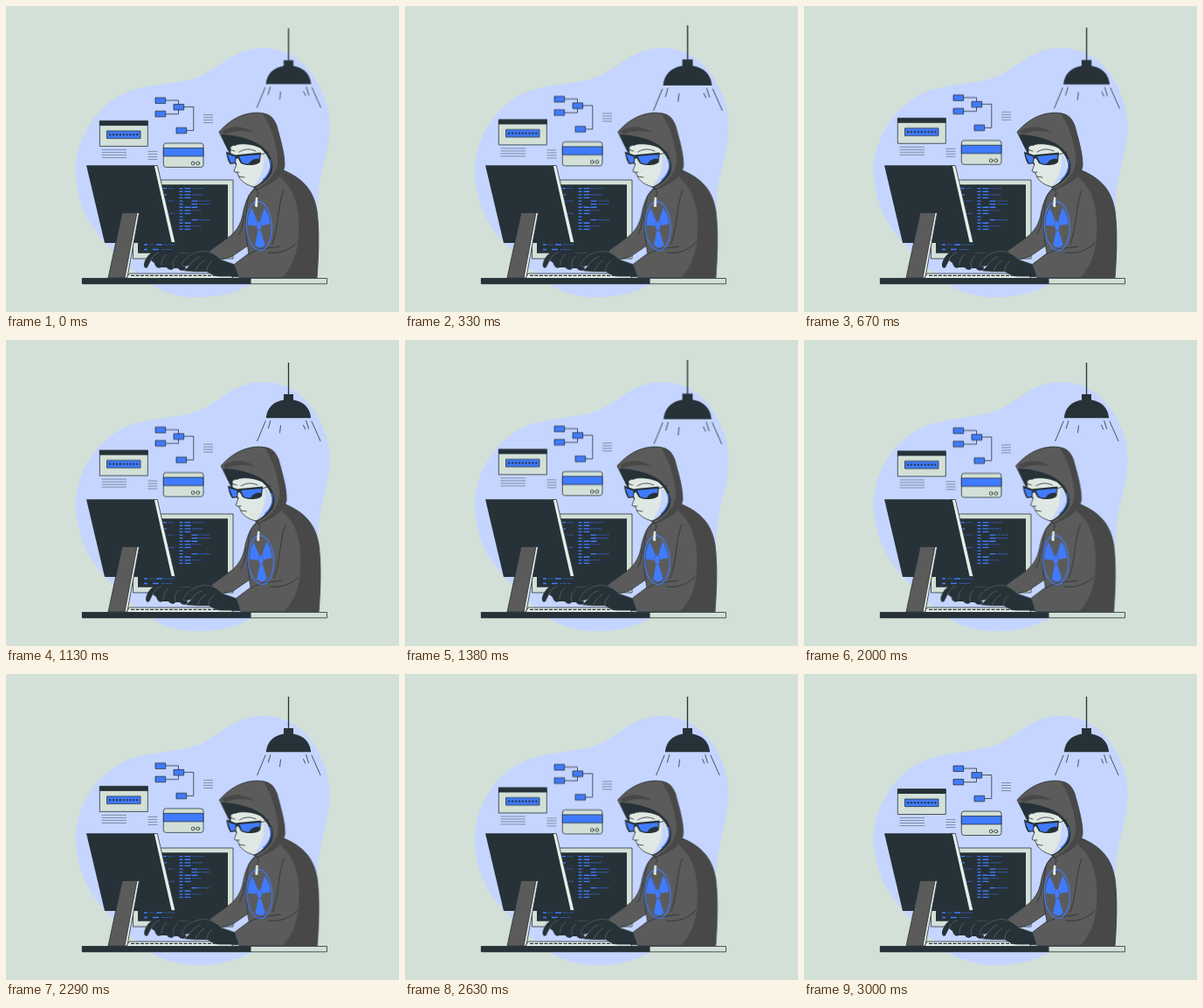
Write an HTML page without scripts that moves like this. It is 450 by 350 pixels and loops after 3040 ms.

```html
<!DOCTYPE html>
<html lang="en">
<head>
<meta charset="utf-8">
<title>Night shift</title>
<style>
  html, body { margin: 0; width: 100%; height: 100%; overflow: hidden; background: #d2e0d7; }
  svg { display: block; width: 100vw; height: 100vh; }
  .ink { fill: #263238; }
  .paper { fill: #d2e0d7; }
  .pale { fill: #e7eee9; }
  .blue { fill: #407bff; }
  .cloth { fill: #5b5b5b; }
  .shade { fill: #484848; }
  .edge { stroke: #263238; stroke-width: .8; stroke-linejoin: round; }
  .line { fill: none; stroke: #263238; stroke-width: .8; stroke-linecap: round; stroke-linejoin: round; }
  .faint { fill: none; stroke: #263238; stroke-width: .6; opacity: .75; }
  .code { fill: none; stroke: #407bff; }
  .dots { stroke-width: 1.1; stroke-dasharray: 1.2 1; opacity: .8; }
  .seam { fill: none; stroke: #6f7a7f; stroke-width: .6; stroke-linecap: round; }

  .float, .pulse, .shake { animation: 3.04s linear -.03s infinite; }
  .float { animation-name: float; }
  .pulse { animation-name: pulse; transform-origin: 323.5px 71px; }
  .shake { animation-name: shake; }

  /* 3 s of movement, then a 40 ms rest */
  @keyframes float {
    0%, 98.7%, 100% { transform: translateY(0); }
    49.34% { transform: translateY(-7px); }
  }
  @keyframes pulse {
    0%, 29.6%, 39.47%, 59.2%, 100% { transform: scale(1); }
    9.87%, 49.34% { transform: scale(1.1); }
  }
  @keyframes shake {
    0%, 98.7%, 100% { transform: translateX(0); }
    9.87%, 88.8% { transform: translateX(-.7px); }
    19.74%, 78.95% { transform: translateX(1.4px); }
    29.6%, 49.34%, 69.08% { transform: translateX(-2.8px); }
    39.47%, 59.2% { transform: translateX(2.8px); }
  }
</style>
</head>
<body>
<svg viewBox="0 0 450 350">
  <defs>
    <path id="rows" class="faint" d="M0 0h11M0 3h11M0 6h11M0 9h11"/>
    <path id="blade" d="M-3 -5.200L-11 -22A25 25 0 0 1 11 -22L3 -5.200A6 6 0 0 0 -3 -5.200z"/>
  </defs>

  <path fill="#c5d5ff" d="M80 190C79 162 94 125 128 104C152 90 178 91 206 85C243 78 254 48 296 48C337 49 358 82 367 112C375 140 368 165 361 192C354 222 360 250 345 278C328 306 299 309 278 320C258 330 240 333 220 333C193 333 177 326 162 316C146 305 130 288 113 270C93 249 81 222 80 190z"/>

  <g class="pulse">
    <path class="line" style="stroke-width:1.3" d="M323.500 26.500V63"/>
    <path class="ink" d="M318 62h11v6.500c12 2 19 9 20.200 20.700h-51.400c1.200-11.700 8.200-18.700 20.200-20.700z"/>
    <path class="line" d="M297 93L287.700 115.500M302.800 92.500L300.300 101M314.500 98L313.500 106M340.500 97.500L342.700 102M343.700 92.500L346.500 101.500M350 93L360 115.500"/>
  </g>

  <g class="float">
    <path class="line" d="M183 108h14.500v5M183 123.700h14.500v-5M203.500 115.500h11.300v27h-8.500"/>
    <g class="blue edge">
      <rect x="171" y="105" width="11.700" height="6.500"/>
      <rect x="192" y="112.500" width="11.700" height="6.500"/>
      <rect x="171" y="120.300" width="11.700" height="6.500"/>
      <rect x="195" y="139.300" width="11.700" height="6.500"/>
    </g>
    <use href="#rows" x="226" y="124.500"/>
    <use href="#rows" x="162.500" y="166.500"/>
    <path class="faint" d="M109.500 164.500h28.500m-28.500 3h28.500m-28.500 3h28.500m-28.500 3h28.500"/>

    <rect class="paper edge" x="107.300" y="131.700" width="55" height="28.800"/>
    <path class="ink" d="M107 131.300h55.600v5.700h-55.600z"/>
    <rect class="blue edge" x="115.500" y="143" width="38.500" height="8.600"/>
    <path fill="none" stroke="#263238" stroke-width="2" stroke-dasharray="2.200 1.700" d="M118 147.300h33.500"/>

    <rect class="paper edge" x="180.300" y="157" width="45.700" height="27.500" rx="3"/>
    <path class="blue edge" d="M180.300 162.500h45.700v9.400h-45.700z"/>
    <g class="line"><circle cx="214.200" cy="180" r="1.900"/><circle cx="219.800" cy="180" r="1.900"/></g>
  </g>

  <!-- rear screen -->
  <path class="paper edge" d="M145.500 199h114.500v90h-114.500z"/>
  <path class="ink" d="M151 204.300h103v78.500h-103z"/>
  <g class="code">
    <path stroke-width="4" stroke-dasharray="1.300 2.300" d="M200.500 208V256"/>
    <path stroke-width="7" stroke-dasharray="1.300 2.300" d="M208 208V222M216 222.400V231M208 229.600V240M216 244V247M208 247.600V256"/>
    <path class="dots" d="M213 208.700h14M213 215.900h12M221 223h13M221 226.600h12M213 233.800h10M221 244.600h13M213 251.800h10"/>
    <path stroke-width="4" stroke-dasharray="1.200 6" d="M182 208V262"/>
    <path class="dots" d="M186 208.700h7M186 223h7M186 237.400h7"/>
    <path stroke-width="1.500" d="M158 273h4M158 278.500h4M172 273h7M168 278.500h7"/>
    <path class="dots" d="M164 273h6M181 273h13M178 278.500h12"/>
  </g>

  <!-- front screen -->
  <path class="pale edge" d="M169 182.500h4.300L193.800 270.500H188z"/>
  <path class="ink" d="M92 182.300h77.700L189.800 271H113z"/>
  <path class="pale edge" d="M149 236.500h3.500L138.800 311H135z"/>
  <path class="cloth edge" d="M133 236.500h17L136 311H117z"/>

  <path class="pale edge" d="M141 306h116l3 5.500h-122z"/>
  <path fill="none" stroke="#263238" stroke-width="1.200" stroke-dasharray="4 1.500" d="M143 308.300h112"/>

  <g class="shake">
    <!-- far arm and torso -->
    <path class="cloth edge" d="M287 207C279 212 275 222 272 234C270 247 266 255 257 263L233 280L241 291L258 287L277 274L292 250z"/>
    <path class="cloth edge" d="M287 207L278 217C273 236 274 262 278 283L262 295L267 311H356C358 285 359 257 356 234C352 211 341 198 318 188L302 202z"/>
    <path class="shade" d="M318 188C341 198 352 211 356 234C359 257 358 285 356 311H316C328 298 334 284 335 262C337 235 332 210 314 196z"/>
    <path class="line" d="M318 211C311 227 313 250 305 272M278 284C290 276 304 277 314 275M300 282C313 284 325 279 333 271M272 238C273 246 271 254 267 261"/>

    <g class="blue" transform="translate(289.800 251.500) rotate(-3) scale(.52 1)">
      <ellipse rx="28" ry="28" fill="none" stroke="#407bff" stroke-width="1.200" vector-effect="non-scaling-stroke"/>
      <circle r="5"/>
      <use href="#blade" transform="rotate(60)"/>
      <use href="#blade" transform="rotate(180)"/>
      <use href="#blade" transform="rotate(300)"/>
    </g>

    <!-- hood and face -->
    <path class="cloth edge" d="M244 144C251 136 264 124 283 122.300C298 121 306 126 310 137C314 152 319 168 319 182C318 196 301 204 287 210L283 207L252 160z"/>
    <path class="shade" d="M294 122.500C302 123 307 128 310 137C314 152 319 168 319 182C318 196 301 204 287 210C301 200 313 190 311 172C309 154 303 137 294 122.500zM247 143C260 136 272 137 284 145C274 142 260 142 250 147z"/>
    <path class="ink" d="M246.500 147C259 147 279 151 291 159C303 168 308 180 304 191C300 199 291 205 284 208L262 180L253 163z"/>
    <path fill="#dfe8e2" class="edge" d="M257 161C265 156 281 157 291 162C302 171 305 182 301 191C296 200 289 205 284 207C276 205 270 201 267 196L265 191L261 189L264 181L257 170z"/>
    <path fill="#c5d5ff" d="M294 168C302 175 303 187 298 195C294 200 289 204 284 206C292 196 297 184 294 168z"/>
    <path fill="none" stroke="#407bff" stroke-width="1.200" d="M302 175C305 184 301 193 294 199"/>
    <path class="ink" d="M247.500 149C258 148 270 150 278 154C270 154 266 156 263 160C258 157 255 159 252 160z"/>
    <path class="line" d="M256 164L262 166M267 167C273 163 280 163 286 166M267 195L273 196M264 190L267 190"/>
    <path class="ink" d="M252 166.500L263 170.500L266 170L292 167.500L291 178C289 183 274 183 269 180L265.500 174L263.500 175L263 180L257 181C254 178 252.500 171 252 166.500z"/>
    <path class="blue" d="M253.500 169.500L262.500 172.500L262 179L257.500 179.500zM267 172L290.500 170L290 175C284 174 280 177 278 180.500C274 180.500 271 180 270 178.500z"/>
    <path class="line" d="M291 170L301 167M286 208L289 213L287 219"/>
    <path class="pale" d="M286 218.500l2.300.5-.3 11-3-.8z"/>

    <!-- gloves -->
    <path class="ink" d="M158.500 293C161 286 166 281 173 279.500C180 278.500 187 280 194 282C207 284 219 281 232 279.500L241 290C230 296 216 293 205 295L206 301C203 304 199 303 197 300L192 300C190 303 186 302 184 299L177 299C174 301 171 298 170 294L166 291L162 299C159 301 157 298 158.500 293z"/>
    <path class="seam" d="M166 291C168 286 171 283 175 282M178 296C178 290 181 286 184 284M192 299C190 293 192 289 196 286"/>
    <path class="ink" stroke="#6f7a7f" stroke-width=".5" d="M202 294C206 287 214 282 222 281C232 279 240 284 246 290L262 295.500L267 310H246C239 310 234 306 230 304L216 304L204 303L210 297L204 298C201 298 201 296 202 294z"/>
    <path class="seam" d="M210 297C214 291 218 288 222 287M217 303C219 298 222 294 227 291M230 303C230 298 232 295 236 292"/>
  </g>

  <path class="paper edge" d="M87.300 311.500h280.200v6.300h-280.200z"/>
  <path class="ink" d="M87 311.200h193.500v6.900h-193.500z"/>
  <path fill="none" stroke="#e7eee9" stroke-width="1.200" d="M219 310h39"/>
</svg>
</body>
</html>
```
